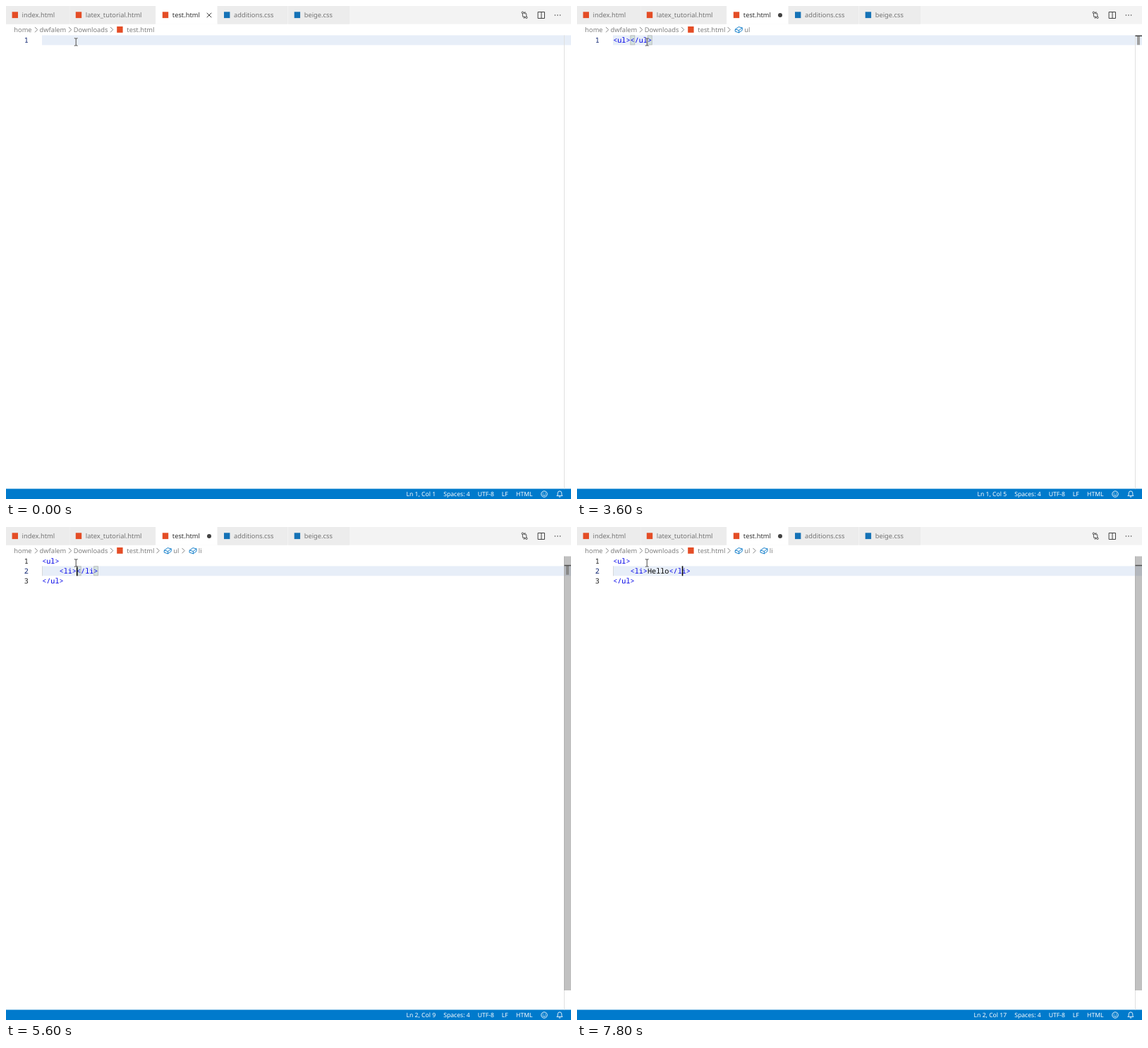
These frames come from a looping animation (801 px wide and 699 px high, 8000 ms). An HTML page:

```html
<!DOCTYPE html>
<html lang="en">
<head>
<meta charset="utf-8">
<title>Editor abbreviations</title>
<style>
  html, body { margin: 0; width: 100%; height: 100%; overflow: hidden; background: #fff; }
  svg { display: block; width: 801px; height: 699px; }
  text { text-rendering: geometricPrecision; white-space: pre; }
  .ui { font: 9.3px "Noto Sans", sans-serif; }
  .status { font: 8.65px "Noto Sans", sans-serif; fill: #fff; }
  .code { font: 10.17px "Noto Sans Mono", monospace; }
  .match { fill: #0066bf; font-weight: bold; }
  .line { fill: none; stroke-linecap: round; stroke-linejoin: round; }
</style>
</head>
<body>
<svg id="stage" viewBox="0 0 801 699">
  <g id="frame"></g>
  <g id="editor"></g>
  <g id="pointer" class="line">
    <path d="M97.2 45.8H98.6L99.2 46.4L99.8 45.8H101.2M99.2 46.4V55.6M97.2 56.2H98.6L99.2 55.6L99.8 56.2H101.2" stroke="#fff" stroke-width="2" opacity=".6"/>
    <path d="M97.2 45.8H98.6L99.2 46.4L99.8 45.8H101.2M99.2 46.4V55.6M97.2 56.2H98.6L99.2 55.6L99.8 56.2H101.2" stroke="#333" stroke-width=".9"/>
  </g>
</svg>
<script>
const LOOP = 8000;
const LEFT = 51.2, TOP = 41.5, CHAR = 6.1, ROW = 13.9, BOTTOM = 684.5;
const POPUP_WIDTH = 313.5, VISIBLE_ROWS = 12;
const HTML_COLOR = '#e44d26', CSS_COLOR = '#1572b6';

const escapeText = s => s.replace(/&/g, '&amp;').replace(/</g, '&lt;');
const rect = (x, y, w, h, fill, extra = '') =>
  `<rect x="${x}" y="${y}" width="${w}" height="${h}" fill="${fill}" ${extra}/>`;
const text = (x, y, s, cls, fill, extra = '') =>
  `<text x="${x}" y="${y}" class="${cls}" ${fill ? `fill="${fill}"` : ''} ${extra}>${escapeText(s)}</text>`;
const stroke = (d, color, width = 1) =>
  `<path class="line" d="${d}" stroke="${color}" stroke-width="${width}"/>`;
const circle = (x, y, r, attrs) => `<circle cx="${x}" cy="${y}" r="${r}" ${attrs}/>`;

const colX = col => LEFT + (col - 1) * CHAR;
const rowY = row => TOP + (row - 1) * ROW;

// Completion lists: typed prefix, names, and whether more rows lie below.
const links = ['link', ...'atom css favicon im import manifest mf print rss touch'
  .split(' ').map(s => 'link:' + s)];
const lists = {
  u: { names: ['u', 'ul', 'uline'] },
  ul: { names: ['ul', 'uline'] },
  l: { names: ['label', 'leg', 'legend', 'li', ...links], more: true },
  li: { names: ['li', ...links] },
  H: { names: 'H1 H2 H3 H4 H5 H6 Hdr Head Head Header Hr Html'.split(' '), more: true },
  He: { names: ['Head', 'Head', 'Header'] }
};

const item = s => `    <li>${s}</li>`;
const typed = (s, popup) => ({ lines: ['<ul>', item(s), '</ul>'], col: 9 + s.length, popup, caret: true });

// Each step changes some fields of the state and keeps the rest.
const steps = [
  [0, { lines: [''], row: 1, col: 1, crumbs: [] }],
  [1200, { caret: true }],
  [1700, { caret: false }],
  [2200, { lines: ['u'], col: 2, caret: true, dirty: true, mark: 1 }],
  [2300, { popup: 'u' }],
  [2700, { lines: ['ul'], col: 3, popup: 'ul' }],
  [3100, { lines: ['<ul></ul>'], col: 5, popup: null, brackets: true }],
  [3500, { crumbs: ['ul'] }],
  [3600, { caret: false }],
  [3800, { lines: ['<ul>', '', '</ul>'], row: 2, col: 5, caret: true, brackets: false, slider: true }],
  [3900, { mark: 2 }],
  [4200, { caret: false }],
  [4700, { lines: ['<ul>', '    l', '</ul>'], col: 6, caret: true, popup: 'l' }],
  [4900, { lines: ['<ul>', '    li', '</ul>'], col: 7, popup: 'li' }],
  [5200, typed('', null)],
  [5400, { brackets: true }],
  [5600, { crumbs: ['ul', 'li'] }],
  [5700, { caret: false }],
  [6200, typed('H', 'H')],
  [6400, typed('He', 'He')],
  [6600, typed('Hel', null)],
  [6800, typed('Hell', null)],
  [7000, typed('Hello', null)],
  [7500, { col: 15 }],
  [7600, { col: 16 }],
  [7800, { col: 17, brackets: false }]
];
const states = [];
for (const [at, change] of steps) states.push({ ...states.at(-1), ...change, at });

function chevron(x) {
  return stroke(`M${x - 1.7} 30.2L${x + 1.7} 33.6L${x - 1.7} 37`, '#777', .9);
}

function cube(x) {
  return stroke(`M${x} 33L${x + 4.6} 29.6L${x + 9.6} 31V34.4L${x + 5} 37.8L${x} 36.2ZM${x} 33L${x + 5} 34.5L${x + 9.6} 31M${x + 5} 34.5V37.8`, '#1580cc', 1);
}

function wrench(x, y) {
  return stroke(`M${x + .4} ${y + 8}L${x + 5} ${y + 3.7}C${x + 4.2} ${y + 1.2} ${x + 6} ${y - .5} ${x + 8.2} ${y}` +
    `L${x + 6.8} ${y + 1.6}L${x + 8.2} ${y + 3}L${x + 9.8} ${y + 1.6}C${x + 10.2} ${y + 4} ${x + 8.6} ${y + 5.6} ${x + 6.4} ${y + 5}` +
    `L${x + 2} ${y + 9.5}C${x + .8} ${y + 10} ${x - .2} ${y + 9} ${x + .4} ${y + 8}Z`, '#424242', .9);
}

function drawFrame() {
  const tabs = [
    [0, 90, 22.6, 'index.html', HTML_COLOR],
    [90.7, 121, 112.8, 'latex_tutorial.html', HTML_COLOR],
    [212.3, 87, 235.8, 'test.html', HTML_COLOR],
    [300, 99, 323, 'additions.css', CSS_COLOR],
    [400, 87, 422.7, 'beige.css', CSS_COLOR]
  ];
  let out = rect(0, 0, 801, 25.6, '#f3f3f3');
  for (const [x, w, tx, name, color] of tabs) {
    const active = name === 'test.html';
    out += rect(x, 0, w, 25.6, active ? '#fff' : '#ececec') +
      rect(tx - 14, 8.3, 8.4, 8.8, color) +
      text(tx, 16.2, name, 'ui', active ? '#333' : '#747474');
  }
  // Editor actions
  out += stroke('M732.4 10.5V14.2Q732.4 16 734.2 16H735.6M734.2 14.4L735.8 16L734.2 17.6M737.8 15V11.6Q737.8 9.8 736 9.8H734.6M736 8.2L734.4 9.8L736 11.4', '#424242', .9) +
    circle(732.4, 9.3, 1.3, 'fill="none" stroke="#424242" stroke-width=".9"') +
    circle(737.8, 16.3, 1.3, 'fill="none" stroke="#424242" stroke-width=".9"') +
    stroke('M754.5 8.5H763.5V17.5H754.5ZM759 8.5V17.5', '#424242', 1);
  for (const x of [778.4, 782, 785.6]) out += circle(x, 13, .8, 'fill="#424242"');

  for (const [x, s] of [[11.3, 'home'], [47.5, 'dwfalem'], [95.8, 'Downloads'], [171.3, 'test.html']])
    out += text(x, 36.9, s, 'ui', '#808080');
  out += [43, 91, 150].map(chevron).join('') + rect(157.2, 29, 8.4, 8.8, HTML_COLOR);

  out += rect(0, BOTTOM, 801, 14.5, '#007acc');
  for (const [x, s] of [[620.2, 'Spaces: 4'], [668.7, 'UTF-8'], [702.7, 'LF'], [723, 'HTML']])
    out += text(x, 695.1, s, 'status');
  out += circle(763, 692, 4.2, 'fill="none" stroke="#fff" stroke-width=".9"') +
    circle(761.5, 690.8, .6, 'fill="#fff"') + circle(764.5, 690.8, .6, 'fill="#fff"') +
    stroke('M760.8 693.2Q763 695.4 765.2 693.2', '#fff', .8) +
    stroke('M781.2 694.4H788.8L787.8 692.8V690.6Q787.6 687.8 785 687.8Q782.4 687.8 782.2 690.6V692.8ZM784.2 696H785.8', '#fff', .9);
  return out;
}

function drawCode(line, row) {
  const y = rowY(row) + 10.6;
  let col = 1, out = '';
  for (const part of line.split(/(<[^>]*>|^ +)/)) {
    if (part.trim()) out += text(colX(col), y, part, 'code', part[0] === '<' ? '#0000e8' : '#000');
    col += part.length;
  }
  return out;
}

function drawBrackets({ lines, row }) {
  const line = lines[row - 1];
  return [line.indexOf('</'), line.length - 1].map(i =>
    rect(colX(i + 1) + .3, rowY(row) + .4, CHAR - .2, ROW - .9, 'rgba(0,100,0,.1)',
      'stroke="#b4b4b4" stroke-width=".8"')).join('');
}

function drawPopup({ popup, row, col }) {
  const { names, more } = lists[popup];
  const rows = names.slice(0, VISIBLE_ROWS);
  const x = colX(col) + .4, y = rowY(row + 1), right = x + POPUP_WIDTH;
  const height = rows.length * ROW;
  let out = rect(x, y + .3, POPUP_WIDTH, height, '#f3f3f3') + rect(x, y + .3, POPUP_WIDTH, ROW, '#d6ebff');
  rows.forEach((name, i) => {
    const top = y + i * ROW;
    out += name === 'uline'
      ? rect(x + 5.6, top + 3, 8.6, 8.6, 'none', 'stroke="#424242" stroke-width=".9"')
      : wrench(x + 4.8, top + 2.4);
    out += `<text class="code" x="${x + 18}" y="${top + 10.9}"><tspan class="match">${popup}</tspan>${name.slice(popup.length)}</text>`;
  });
  out += text(right - 21.6, y + 10.9, 'Emmet Abbreviation', 'code', '#484848', 'text-anchor="end"') +
    circle(right - 14.4, y + 7.6, 3.7, 'fill="none" stroke="#61788c" stroke-width=".8"') +
    stroke(`M${right - 14.4} ${y + 7.3}v2M${right - 14.4} ${y + 5.7}v.1`, '#61788c', .8);
  if (more) out += rect(right - 7.4, y + .5, 7.2, 133.5, '#b5b5b5');
  return out + rect(x, y + .3, POPUP_WIDTH, height, 'none', 'stroke="#c4c6c8" stroke-width=".8"');
}

function drawRuler({ mark, brackets, row, slider }) {
  let out = rect(791, TOP, 1, BOTTOM - TOP, '#e0e0e0');
  if (brackets) out += rect(794, row === 1 ? 42.5 : 55, 4, 12.7, '#a0a0a0');
  if (mark) out += rect(791.5, mark === 1 ? 41.6 : 53.8, 9.5, 1.5, '#424242');
  if (slider) out += rect(791, TOP, 10, 615.5, 'rgba(100,100,100,.4)');
  return out;
}

function drawEditor(s) {
  let out = s.dirty
    ? circle(288, 13, 3, 'fill="#424242"')
    : stroke('M285 10L291 16M291 10L285 16', '#424242', 1);
  s.crumbs.forEach((name, i) => {
    out += chevron([215.5, 251.5][i]) + cube([224.6, 260.4][i]) +
      text([237.3, 272.8][i], 36.9, name, 'ui', '#808080');
  });
  out += rect(51, rowY(s.row), 750, ROW, '#e7eef8');
  if (s.lines[1]) out += rect(51, rowY(2), .8, ROW, '#d3d3d3');
  if (s.brackets) out += drawBrackets(s);
  s.lines.forEach((line, i) => {
    out += text(31.8, rowY(i + 1) + 10.8, String(i + 1), 'code',
      i + 1 === s.row ? '#0b216f' : '#1a1a1a', 'text-anchor="end"') + drawCode(line, i + 1);
  });
  out += drawRuler(s);
  if (s.caret) out += rect(colX(s.col), rowY(s.row), 1.5, ROW, '#000');
  if (s.popup) out += drawPopup(s);
  return out + text(609.2, 695.1, `Ln ${s.row}, Col ${s.col}`, 'status', '', 'text-anchor="end"');
}

const editor = document.getElementById('editor');
document.getElementById('frame').innerHTML = drawFrame();

const start = performance.now();
let shown;
function tick() {
  const time = (performance.now() - start) % LOOP;
  const state = states.findLast(s => s.at <= time);
  if (state !== shown) {
    shown = state;
    editor.innerHTML = drawEditor(state);
  }
  requestAnimationFrame(tick);
}
tick();
</script>
</body>
</html>
```
